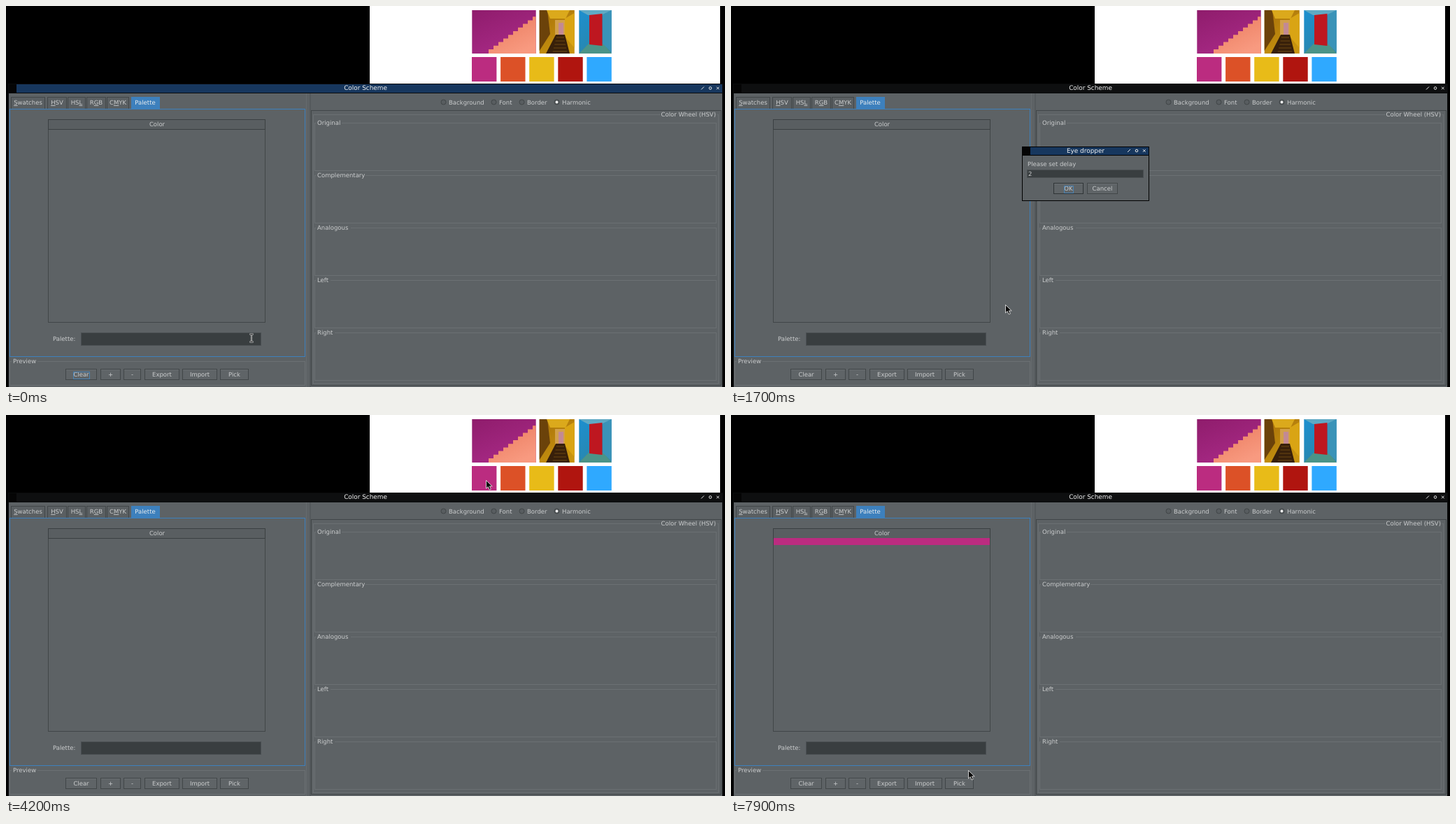
These frames come from a looping animation (1028 by 545 pixels, 8 s). An HTML page:

```html
<!DOCTYPE html>
<html lang="en">
<head>
<meta charset="utf-8">
<title>Color Scheme</title>
<style>
  html, body { margin: 0; width: 100%; height: 100%; overflow: hidden; background: #000; }
  svg { display: block; width: 100vw; height: 100vh; }
  text { font: 8.5px "DejaVu Sans", sans-serif; fill: #cbcdce; text-rendering: geometricPrecision; white-space: pre; }
  .title { font-size: 8.9px; fill: #f2f2f2; }
  .u { text-decoration: underline; text-decoration-thickness: .6px; }
  rect, .crisp { shape-rendering: crispEdges; }
  .soft rect { shape-rendering: auto; }
</style>
</head>
<body>
<svg id="stage" viewBox="0 0 1028 545" xmlns="http://www.w3.org/2000/svg"></svg>
<script>
const NS = "http://www.w3.org/2000/svg";
const stage = document.getElementById("stage");
const BODY = "#5d6265", EDGE = "#414648", SOFT = "#6b7073", FIELD = "#393e40", BLUE = "#3d80bd";
const ACTIVE = "#17375e", INACTIVE = "#0e0f10", PINK = "#bb2c80";

function add(parent, tag, attrs = {}) {
  const el = document.createElementNS(NS, tag);
  for (const key in attrs) el.setAttribute(key, attrs[key]);
  parent.append(el);
  return el;
}
const group = (parent, cls = "") => add(parent, "g", { class: cls });
const box = (p, x1, y1, x2, y2, fill) =>
  add(p, "rect", { x: x1, y: y1, width: x2 - x1, height: y2 - y1, fill });
const frame = (p, x1, y1, x2, y2, stroke, fill = "none") =>
  add(p, "rect", { x: x1 + .5, y: y1 + .5, width: x2 - x1 - 1, height: y2 - y1 - 1, fill, stroke });
const path = (p, d, fill, stroke = "none") => add(p, "path", { d, fill, stroke });

// y is the middle of the line; an underscore marks the underlined letter
function label(p, text, x, y, anchor = "start", cls = "") {
  const el = add(p, "text", { x, y: y + 3, "text-anchor": anchor, class: cls });
  text.split(/(_.)/).forEach(part => {
    if (part[0] === "_") {
      const letter = add(el, "tspan", { class: "u" });
      letter.textContent = part[1];
    } else el.append(part);
  });
  return el;
}

function button(p, text, x1, y1, x2, edge = EDGE) {
  frame(p, x1, y1, x2, y1 + 16, edge, "#5f6467");
  path(p, `M${x1 + 1} ${y1 + 1.5}H${x2 - 1}`, "none", "#696e71").setAttribute("class", "crisp");
  return label(p, text, (x1 + x2) / 2, y1 + 8, "middle");
}

function focusRing(text) {
  const { x, y, width, height } = text.getBBox();
  const left = Math.round(x), top = Math.round(y);
  return frame(text.parentNode, left, top, left + Math.round(width) + 1, top + Math.round(height) + 1, "#4a83b4");
}

function titleBar(p, text, x1, y1, x2, y2) {
  const bar = box(p, x1, y1, x2, y2, ACTIVE);
  const mid = (y1 + y2) / 2;
  box(p, x1, y1, x1 + 11, y2, "#050505");
  label(p, text, (x1 + x2) / 2, mid - .9, "middle", "title");
  path(p, `M${x2 - 30} ${mid + 1.5}l4 -4M${x2 - 8} ${mid - 2.3}l3.6 3.6m0 -3.6l-3.6 3.6`, "none", "#e8e8e8");
  add(p, "circle", { cx: x2 - 17, cy: mid - .5, r: 1.8, fill: "none", stroke: "#e8e8e8" });
  return bar;
}

function titled(p, text, x1, y1, x2, y2, gapStart, gapEnd) {
  path(p, `M${gapStart} ${y1 + .5}H${x1 + .5}V${y2 + .5}H${x2 + .5}V${y1 + .5}H${gapEnd}`, "none", SOFT)
    .setAttribute("class", "crisp");
  label(p, text, gapStart + 2, y1);
}

const defs = add(stage, "defs");
function gradient(id, from, to) {
  const g = add(defs, "linearGradient", { id, x1: 0, y1: 0, x2: .6, y2: 1 });
  add(g, "stop", { "stop-color": from });
  add(g, "stop", { offset: 1, "stop-color": to });
  return `url(#${id})`;
}

function drawPhotos(p) {
  box(p, 666.3, 6, 757.7, 68, gradient("wall", "#8f1c6c", "#a82a86"));
  let stairs = "M690 68V62";
  for (let i = 0; i < 9; i++) stairs += "h7v-5.2";
  path(p, stairs + "H757.7V68Z", gradient("stairs", "#e9795c", "#f89a80"));

  box(p, 762.7, 6, 812.8, 68, gradient("hall", "#a8700a", "#c8940f"));
  path(p, "M762.7 6H774L778 40L762.7 64Z", "#6b420a");
  path(p, "M773 6H806L800 18H778Z", "#dba91c");
  path(p, "M799 18L812.8 10V60L799 44Z", "#d9a414");
  box(p, 785, 20, 799, 42, "#d2a04a");
  box(p, 790, 24, 797, 41, "#c38a94");
  path(p, "M786 41H799L806 68H772Z", "#38200a");
  for (let y = 45; y < 68; y += 5) path(p, `M${798 - y / 4} ${y}H${789 + y / 5}`, "none", "#6b4612");

  box(p, 819.3, 6, 865.7, 68, gradient("room", "#1c8fd0", "#2b86a8"));
  path(p, "M819.3 6H865.7L855 13H832Z", "#5fa9c4");
  path(p, "M819.3 68L833 54H855L865.7 68Z", "#4b9488");
  path(p, "M853 12L865.7 6V66L853 54Z", "#3a93b8");
  path(p, "M834 13L852.5 11V57L834 55Z", "#be1720");

  ["#bb2c80", "#dc5127", "#e8bb18", "#b0150f", "#2fa9ff"].forEach((color, i) => {
    const x = 666 + i * 41.1;
    box(p, x, 73, x + 35.4, 108, color);
  });
}

function drawTabs(p) {
  [["_Swatches", 7, 56], ["_HSV", 59, 87], ["HS_L", 88, 114], ["R_GB", 115, 143], ["C_MYK", 144, 176]]
    .forEach(([text, x1, x2]) => {
      frame(p, x1, 130, x2, 148, EDGE, "#5a5f62");
      label(p, text, (x1 + x2) / 2, 138, "middle");
    });
  frame(p, 5, 147, 428, 502, BLUE);
  box(p, 179, 130, 220, 148, BLUE);
  label(p, "Palette", 199, 138, "middle").style.fill = "#e6eaee";
}

function drawRight(p) {
  [["Background", 633], ["Font", 705], ["Border", 745], ["Harmonic", 795]].forEach(([text, x], i) => {
    add(p, "circle", { cx: x - 7.5, cy: 137.5, r: 3.5, fill: "#585d60", stroke: EDGE });
    if (i === 3) add(p, "circle", { cx: x - 7.5, cy: 137.5, r: 1.9, fill: "#f0f0f0" });
    label(p, text, x, 138);
  });
  frame(p, 436, 149, 1023, 543, EDGE);
  path(p, "M936 155.5H439.5V540.5H1018.5V155.5H1017", "none", SOFT).setAttribute("class", "crisp");
  label(p, "Color Wheel (HSV)", 1015, 155, "end");
  ["Original", "Complementary", "Analogous", "Left", "Right"].forEach((text, i) => {
    const y = Math.round(166.5 + i * 75.2);
    titled(p, text, 441, y, 1015, y + 68, 443, 449 + [31, 65, 44, 15, 21][i]);
  });
}

function drawDialog(bottom) {
  const g = group(stage);
  box(g, 416, 201, 598, bottom, "#000");
  box(g, 417, 214, 597, bottom - 1, BODY);
  titleBar(g, "Eye dropper", 417, 202, 597, 213);
  return g;
}

box(stage, 0, 0, 1028, 545, "#000");
box(stage, 520, 0, 1021, 111, "#fff");
drawPhotos(group(stage, "soft"));
box(stage, 3, 111, 1025, 545, "#0a0b0c");
const mainBar = titleBar(stage, "Color Scheme", 4, 112, 1024, 124);
box(stage, 4, 125, 1024, 545, BODY);
box(stage, 429, 125, 430, 545, "#666b6e");
box(stage, 434, 125, 436, 545, "#54595c");
drawTabs(stage);
drawRight(stage);

frame(stage, 60, 162, 371, 453, EDGE);
frame(stage, 60, 162, 371, 177, "#3b4042", "#595e61");
label(stage, "Color", 216, 169, "middle");
const row = box(stage, 61, 176, 370, 186, PINK);
label(stage, "Palette:", 67, 476);
frame(stage, 107, 467, 365, 486, "#4a4f52", FIELD);
titled(stage, "Preview", 5, 508, 427, 542, 8, 45);
const clearRing = focusRing(button(stage, "Clear", 85, 519, 130));
[["+", 135, 164], ["-", 168, 193], ["Export", 198, 248], ["Import", 252, 302]]
  .forEach(([text, x1, x2]) => button(stage, text, x1, 519, x2));
const pickRing = focusRing(button(stage, "Pick", 306, 519, 347));

const askDelay = drawDialog(279);
label(askDelay, "Please set delay", 424, 226);
frame(askDelay, 423, 234, 590, 246, "#4a4f52", FIELD);
label(askDelay, "2", 425, 240);
focusRing(button(askDelay, "OK", 461, 253, 504, "#2f3436"));
button(askDelay, "Cancel", 509, 253, 553);

const saved = drawDialog(277);
label(saved, "Color saved to palette.", 424, 233);
focusRing(button(saved, "OK", 494, 251, 520, "#3a3f41"));

const arrow = path(stage, "M.5 .5V12L3.2 9.6L5.2 14L7.3 13.1L5.4 8.9H9.2Z", "#080808", "#f4f4f4");
arrow.setAttribute("stroke-width", .8);
const beam = group(stage);
path(beam, "M-2.5 -5.5H2.5M-2.5 5.5H2.5M0 -5.5V5.5", "none", "#e8e8e8").setAttribute("stroke-width", 2.2);
path(beam, "M-2 -5.5H2M-2 5.5H2M0 -5.5V5.5", "none", "#111").setAttribute("stroke-width", .8);

// pointer stops: time, x, y
const stops = [
  [0, 351, 475], [400, 346, 476], [500, 337, 477], [600, 328, 481],
  [700, 327, 499], [800, 328, 516], [900, 329, 526],
  [1500, 341, 510], [1600, 364, 472], [1700, 392, 427], [1800, 420, 380], [1900, 445, 335],
  [2000, 464, 303], [2100, 477, 286], [2200, 489, 271], [2300, 497, 260], [2400, 501, 255],
  [2600, 501, 256], [3500, 539, 226], [3700, 684, 98], [3900, 688, 91], [4200, 686, 93],
  [6000, 687, 96], [6400, 522, 271], [6700, 522, 248], [7000, 512, 259],
  [7300, 501, 270], [7600, 424, 435], [7900, 339, 508]
];
const show = (el, on) => el.setAttribute("visibility", on ? "visible" : "hidden");

function render(t) {
  const within = (from, to) => t >= from && t < to;
  const [, x, y] = stops.findLast(stop => stop[0] <= t);
  for (const el of [arrow, beam]) el.setAttribute("transform", `translate(${x} ${y})`);
  show(beam, t < 700);
  show(arrow, t >= 700);
  show(clearRing, t < 1200);
  show(pickRing, within(1200, 1400));
  mainBar.setAttribute("fill", t < 1400 || within(3500, 3700) ? ACTIVE : INACTIVE);
  show(askDelay, within(1400, 3500));
  show(saved, within(5500, 7300));
  show(row, t >= 5500);
}

const start = performance.now();
function tick() {
  render((performance.now() - start) % 8000);
  requestAnimationFrame(tick);
}
tick();
</script>
</body>
</html>
```
